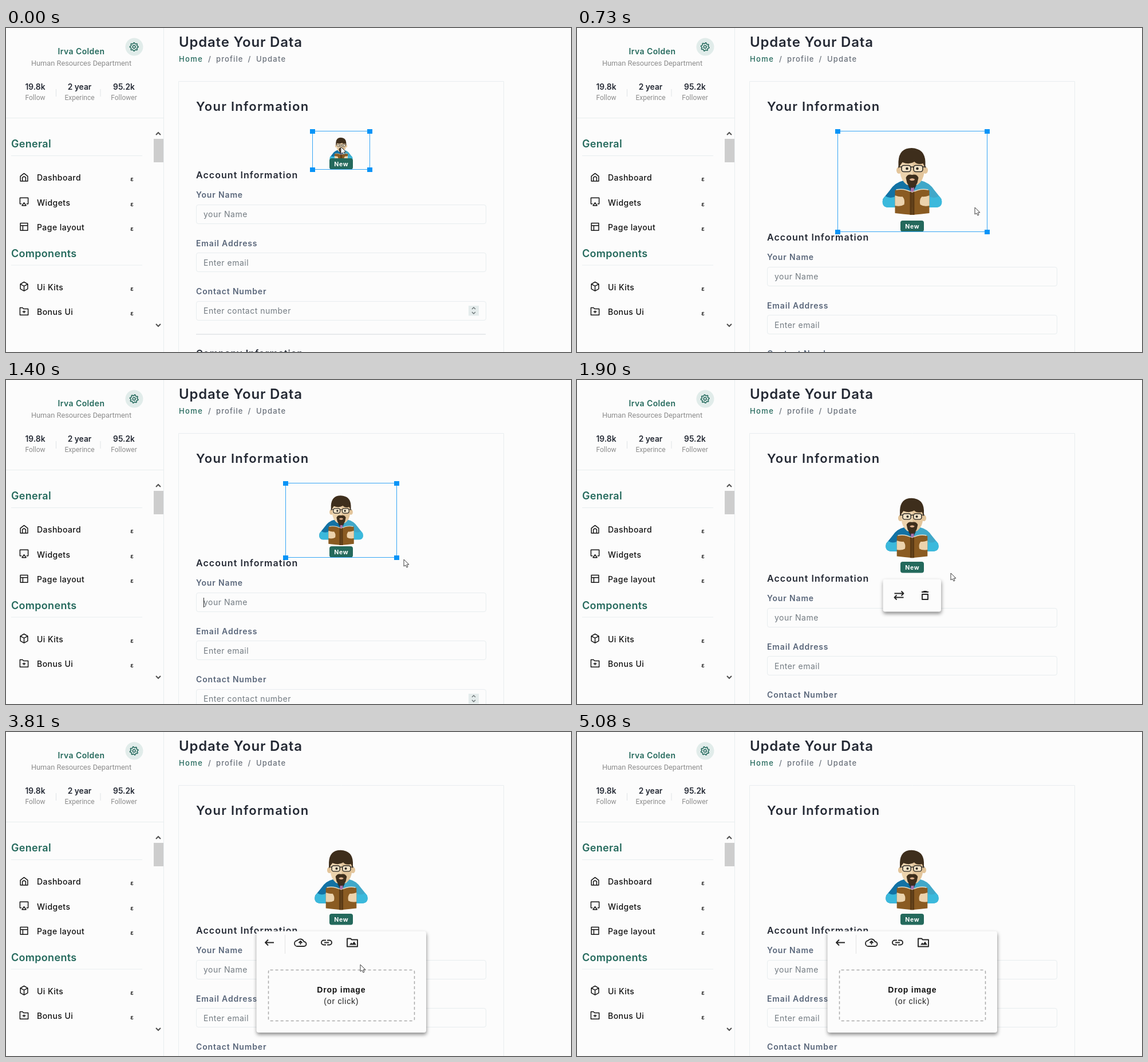
Animation of 987x567 px, one loop 5.18 s. Source, as an HTML page with a canvas:

```html
<!DOCTYPE html>
<html lang="en">
<head>
<meta charset="utf-8">
<title>Update Your Data</title>
<style>
html, body { margin: 0; width: 100%; height: 100%; overflow: hidden; background: #fcfcfc; }
canvas { display: block; width: 987px; height: 567px; }
</style>
</head>
<body>
<canvas id="stage" width="987" height="567"></canvas>
<script>
const c = document.getElementById('stage').getContext('2d');
const LOOP = 5180;
const GREEN = '#24695c', INK = '#242934', LABEL = '#59667a', HINT = '#737b82', CRUMB = '#69707a';
const RULE = '#e8edef', PAPER = '#fcfcfc', ICON = '#262626';
const SANS = 'Inter, "Open Sans", sans-serif', ROBOTO = 'Roboto, sans-serif', ARIAL = '"Liberation Sans", Arial, sans-serif';
const MID = 585.5, TOP = 180.5, START_H = 68;

// Moments when the interface changes state (ms)
const CARET_ON = 1250, DESELECT = 1880, HOVER = 2380, TOOLTIP = 2500, OPEN = 3280, LEAVE = 4600;

const HEIGHT = [[0, START_H], [270, 158], [580, 160], [730, 177], [1380, 131], [1760, 158]];
const POINTER = [[0, 585, 208], [420, 695, 314], [1500, 695, 314], [1890, 653, 338],
  [2500, 573, 379], [3540, 573, 379], [3800, 619, 407], [4420, 904, 552]];

function at(keys, t, i = 1) {
  const n = keys.findIndex(k => k[0] > t);
  if (n < 0) return keys[keys.length - 1][i];
  const a = keys[n - 1], b = keys[n], u = (t - a[0]) / (b[0] - a[0]);
  return a[i] + (b[i] - a[i]) * u * u * (3 - 2 * u);
}

function snap(t) {
  const slow = 146, fast = 127, turn = 6 * slow;
  return t < turn ? t - t % slow : t - (t - turn) % fast;
}

function text(s, x, y, size, weight, color, gap = 0, font = SANS, align = 'left') {
  c.font = `${weight} ${size}px ${font}`;
  c.letterSpacing = gap + 'px';
  c.textAlign = align;
  c.fillStyle = color;
  c.fillText(s, x, y);
}

function rect(x, y, w, h, r, fill, stroke, width = 1) {
  c.beginPath();
  c.roundRect(x, y, w, h, r);
  if (fill) { c.fillStyle = fill; c.fill(); }
  if (stroke) { c.strokeStyle = stroke; c.lineWidth = width; c.stroke(); }
}

function shape(d, fill, stroke, width = 1) {
  const p = new Path2D(d);
  if (fill) { c.fillStyle = fill; c.fill(p); }
  if (stroke) { c.strokeStyle = stroke; c.lineWidth = width; c.stroke(p); }
}

function disc(x, y, rx, fill, ry = rx) {
  c.beginPath();
  c.ellipse(x, y, rx, ry, 0, 0, 7);
  c.fillStyle = fill;
  c.fill();
}

function line(x1, y1, x2, y2, color = RULE, width = 1) {
  shape(`M${x1} ${y1}L${x2} ${y2}`, null, color, width);
}

function icon(d, x, y, color, width, fill, scale = 1) {
  c.save();
  c.translate(x, y);
  c.scale(scale, scale);
  c.lineJoin = 'round';
  shape(d, fill, color, width / scale);
  c.restore();
}

function gear(t) {
  disc(224, 33, 15.5, '#e1ecea');
  c.save();
  c.translate(223.7, 33);
  c.rotate(t / LOOP * Math.PI * 4);
  c.beginPath();
  for (let i = 0; i < 32; i++) {
    const r = i % 4 < 2 ? 7.3 : 5.6, a = (i - 0.5) * Math.PI / 16;
    c.lineTo(r * Math.cos(a), r * Math.sin(a));
  }
  c.closePath();
  c.moveTo(2.4, 0);
  c.arc(0, 0, 2.4, 0, 7);
  c.lineJoin = 'round';
  c.strokeStyle = GREEN;
  c.lineWidth = 1.5;
  c.stroke();
  c.restore();
}

function menu(title, y, items) {
  text(title, 9, y, 18, 600, GREEN, 0.3);
  line(9, y + 14.5, 238, y + 14.5);
  items.forEach(([name, d], i) => {
    const base = y + 58 + i * 43.5;
    icon(d, 23, base - 14.7, '#151515', 1.5, null, 0.71);
    text(name, 54, base, 14, 500, '#111', 0.45);
    text('ε', 217.3, base + 1, 11.5, 700, '#222', 0, ARIAL);
  });
}

function sidebar(t) {
  gear(t);
  text('Irva Colden', 131.5, 46, 14, 600, GREEN, 0.4, SANS, 'center');
  text('Human Resources Department', 131.5, 65.5, 12.8, 400, '#8c8c8c', 0, ROBOTO, 'center');
  [['19.8k', 'Follow'], ['2 year', 'Experince'], ['95.2k', 'Follower']].forEach(([n, s], i) => {
    const x = 51 + i * 77.5;
    text(n, x, 107.5, 13.8, 600, INK, 0, SANS, 'center');
    text(s, x, 126, 12, 400, '#8c8c8c', 0, ROBOTO, 'center');
    if (i) line(x - 41, 107, x - 41, 120, '#dfe3e6');
  });
  line(0, 157.5, 275, 157.5);
  line(275.5, 0, 275.5, 567);
  menu('General', 209, [
    ['Dashboard', 'M3 10l9-7 9 7v12H3zM8 22v-9q4-4 8 0v9'],
    ['Widgets', 'M6 17H2V2h20v15h-4M12 14l5 7H7z'],
    ['Page layout', 'M3 3h18v18H3zM3 9h18M9 9v12']
  ]);
  menu('Components', 400.5, [
    ['Ui Kits', 'M12 1l9 5v12l-9 5-9-5V6zM3 6l9 5 9-5M12 11v12'],
    ['Bonus Ui', 'M2 3h6l3 3h11v15H2zM12 10v7M8 13h8']
  ]);
  rect(258, 194, 17, 41, 0, '#cdcdcd');
  shape('M262 187l4-4 4 4M262 518l4 4 4-4', null, '#505050', 2);
}

function form(dy, t) {
  text('Update Your Data', 302, 33, 24, 600, INK, 0.8);
  text('Home', 302, 58.5, 13, 500, GREEN, 1.4);
  text('/', 353, 58.5, 13, 500, CRUMB);
  text('profile', 367, 58.5, 13, 500, CRUMB, 1.1);
  text('/', 422.5, 58.5, 13, 500, CRUMB);
  text('Update', 437, 58.5, 13, 500, CRUMB, 1.2);
  rect(301.5, 93.5, 568, 500, 0, null, RULE);
  text('Your Information', 332, 145, 22, 600, INK, 1.25);

  c.save();
  c.translate(0, dy);
  text('Account Information', 332, 262.5, 16, 600, INK, 1.05);
  [['Your Name', 'your Name'], ['Email Address', 'Enter email'], ['Contact Number', 'Enter contact number']].forEach(([label, hint], i) => {
    const y = 297 + i * 84.5;
    text(label, 332, y, 14, 600, LABEL, 0.85);
    rect(332.5, Math.floor(y) + 12.5, 506, 33, 3.5, null, RULE);
    text(hint, 345, y + 34, 14, 400, HINT, 0.5);
  });
  rect(808, 486, 18, 17.5, 0, '#e5ecec');
  shape('M814 492l3-3 3 3M814 497l3 3 3-3', null, '#6d7577', 1.4);
  line(332, 536, 838, 536, '#e7eaec', 2);
  text('Company Information', 332, 575, 16, 600, INK, 1.05);
  if (t >= CARET_ON && t < 1700) line(345.5, 318, 345.5, 335, '#222');
  c.restore();
}

// Draws both halves of a symmetric part; side is -1 on the left, 1 on the right.
function mirror(part) {
  for (const side of [-1, 1]) {
    c.save();
    c.scale(side, 1);
    part(side);
    c.restore();
  }
}

function avatar(h) {
  const skin = '#ecd3ad', shade = '#e3c59b', hair = '#3e2e1c', frame = '#2b2925';
  c.save();
  c.translate(MID, TOP);
  c.scale(h / 177, h / 177);
  c.translate(0, -TOP);
  mirror(side => {
    shape('M0 267H15Q30 270 39 284L51 299Q54 314 41 314H0z', side < 0 ? '#1272a4' : '#40a8c9');
    shape('M47 294Q38 300 28 294V314H43Q52 313 52 304 51 298 47 294z', '#3bb9dc');
  });
  shape('M-11 268L0 290 11 268z', '#26303c');
  shape('M-2 279h5l1 9h-7z', '#a873ad');
  mirror(side => {
    disc(23, 249, 4.5, shade, 6);
    shape('M0 226H21V252Q20 266 10 274L0 277z', side < 0 ? skin : shade);
  });
  shape('M-24 246V234Q-23 210-1 210 22 211 23 234V246L19 237Q9 240 4 234-5 240-17 235L-20 239z', hair);
  mirror(() => {
    rect(2.5, 240.5, 16, 11, 4, '#f4e4c8', frame, 1.6);
    disc(9, 246, 2.3, frame);
    line(18, 243, 24, 243, frame, 1.5);
  });
  shape('M-3 244q3-2 6 0', null, frame, 1.6);
  shape('M-11 262Q-8 255 0 257 8 255 11 262L9 271Q5 279 0 280-5 279-9 271z', hair);
  shape('M-5 265Q0 261 5 265 2 268 0 267-2 268-5 265z', '#dcae8a');
  mirror(() => {
    shape('M0 288Q14 280 30 284V324Q14 326 0 327z', '#8a5b22');
    shape('M0 288Q13 280 28 283', null, '#eadfc9', 1.5);
    shape('M0 288L4 286V327H0z', '#5b3a15');
    shape('M30 293Q22 296 17 295 12 300 14 309 20 313 30 311z', skin);
  });
  c.restore();
}

function badge(bottom) {
  rect(565, bottom - 20, 41, 19.5, 4, GREEN);
  text('New', 585.9, bottom - 6, 10.5, 700, '#fff', 0.7, SANS, 'center');
}

function selection(h) {
  const w = Math.round(h * 1.4772), x = Math.floor(MID - w / 2) + 0.5;
  rect(x, TOP, w, h - 1, 0, null, '#35a5f5');
  for (const px of [x, x + w]) {
    for (const py of [TOP, TOP + h - 1]) rect(px - 4.5, py - 3.5, 9, 8, 0, '#0894f7');
  }
}

function panel(x, y, w, h) {
  c.save();
  c.shadowColor = 'rgba(0,0,0,.45)';
  c.shadowBlur = 6;
  c.shadowOffsetX = 0.5;
  c.shadowOffsetY = 3.5;
  rect(x, y, w, h, 4, PAPER);
  c.restore();
}

function tools(t) {
  panel(534.5, 348.5, 101.5, 57);
  if (t >= HOVER) rect(544, 358, 37, 38, 3, '#e6e9ea');
  icon('M-8-3H7M4-7l4 4-4 4M8 4H-7M-4 0l-4 4 4 4', 562.5, 376.5, ICON, 1.8);
  icon('M-6-6H6M-3-7H3M-5-2V7H5V-2z', 608, 377, ICON, 1.9);
  if (t >= TOOLTIP) {
    rect(534, 398, 57, 20.5, 2, '#222');
    text('Replace', 562.5, 412, 11.2, 400, '#fff', 0, ARIAL, 'center');
  }
}

function uploader() {
  const y = 368.5;
  panel(437.5, 348.5, 296.5, 177.5);
  line(487.5, 355, 487.5, 388, '#e2e2e2');
  icon('M8 0H-7M-2-5l-5 5 5 5', 460, y, ICON, 2);
  icon('M-5 7a5 5 0 0 1-1-10a7 7 0 0 1 12 2a4 4 0 0 1 0 8zM0 4V-2M-3 1l3-3 3 3', 514.5, y - 0.5, ICON, 1.9);
  icon('M-1-4H-5a4 4 0 0 0 0 8H-1M1-4H5a4 4 0 0 1 0 8H1M-4 0H4', 560, y, ICON, 1.9);
  icon('M-9-7h6l2 2H9V7H-9z', 605, y, ICON, 1.9);
  icon('M-5 4l3-4 2 2 3-4 4 6z', 605, y, null, 0, ICON);
  c.setLineDash([5, 4]);
  rect(458.5, 416.5, 255, 89, 3, null, '#a9a9a9', 1.5);
  c.setLineDash([]);
  text('Drop image', 585.8, 456, 14, 700, '#111', 0.8, ARIAL, 'center');
  text('(or click)', 585.8, 475.5, 14, 400, '#222', 0.8, ARIAL, 'center');
}

function pointer(t) {
  if (t >= LEAVE) return;
  const x = at(POINTER, t), y = at(POINTER, t, 2);
  if (t >= TOOLTIP && t < OPEN) {
    icon('M2 9V2q1-3 3 0V6l5 1q2 1 2 3l-1 4v2H5V14L0 10q1-2 2-1zM5 6v3M7 7v2M10 7v2', x - 4, y - 1, '#111', 1.1, '#fff', 1.03);
  } else {
    icon('M0 0V12L3 10l2 4 2-1-2-4h4z', x, y, '#3c3c3c', 1, '#fff');
  }
}

function draw(t) {
  const h = Math.round(at(HEIGHT, t));
  c.fillStyle = PAPER;
  c.fillRect(0, 0, 987, 567);
  sidebar(t);
  form(h - START_H, t);
  avatar(h);
  badge(180 + h);
  if (t < DESELECT) selection(h);
  else if (t < OPEN) tools(t);
  else uploader();
  pointer(t);
}

const begun = performance.now();
function tick() {
  draw(snap((performance.now() - begun) % LOOP));
  requestAnimationFrame(tick);
}
tick();
</script>
</body>
</html>
```
